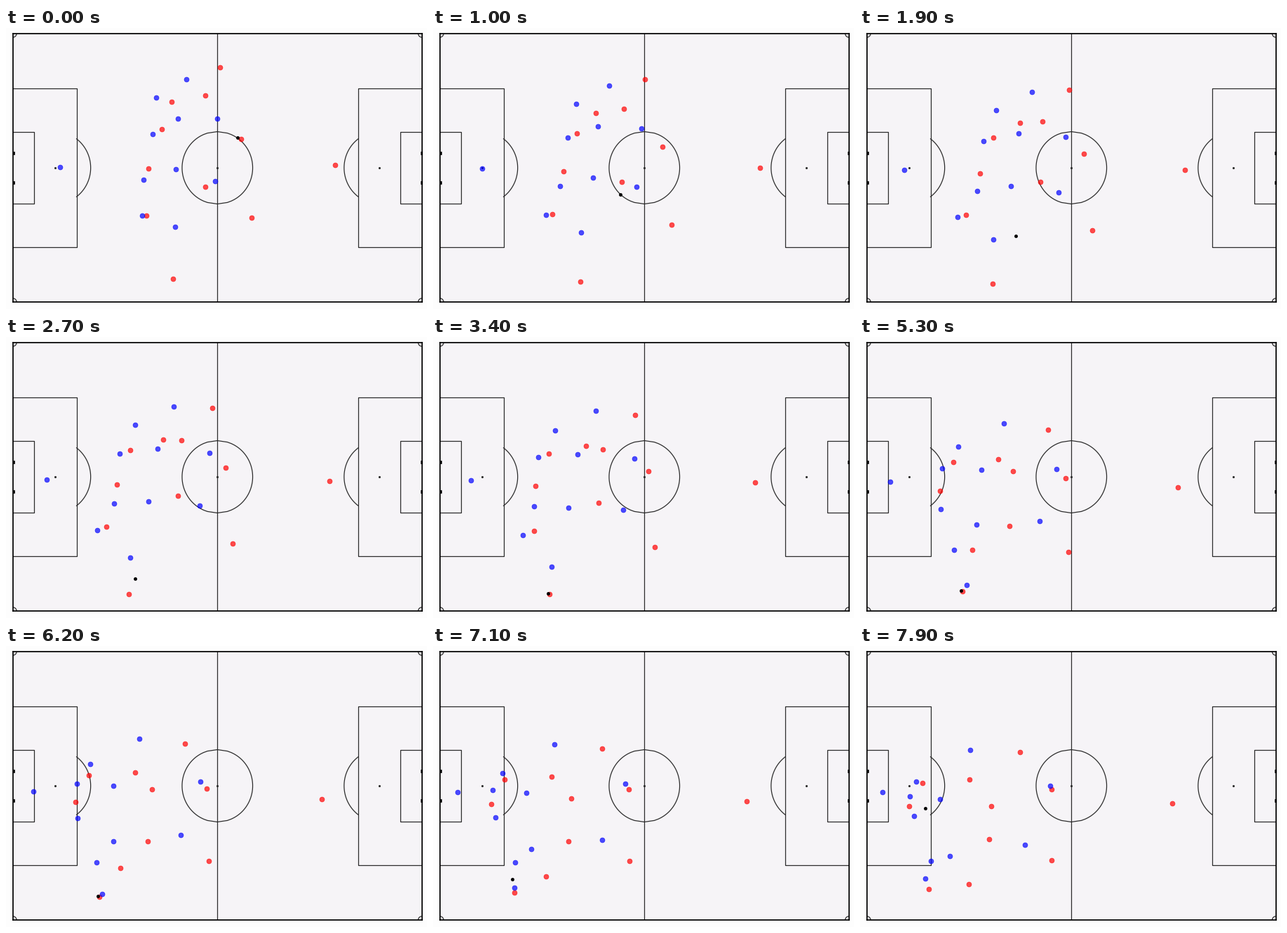
A matplotlib script that plays this animation: 600 by 400 pixels, repeating every 8 s.

```python
import numpy as np
import matplotlib.pyplot as plt
from matplotlib.animation import FuncAnimation

W, H, DPI = 600, 400, 50
FRAMES, STEP = 80, 100
LEFT, RIGHT, TOP, BOTTOM = 10, 592.5, 8, 390
CX, CY = (LEFT + RIGHT) / 2, (TOP + BOTTOM) / 2
HALF_L, HALF_W = (RIGHT - LEFT) / 2, (BOTTOM - TOP) / 2
YARD_X, YARD_Y = 5.03, 5.148  # pixels per yard
LINE = dict(color="#2c2c2c", linewidth=1.8)
END = (FRAMES - 1) * STEP / 1000
PASS_END, CROSS_START = 3.05, 6.95  # seconds

fig = plt.figure(figsize=(W / DPI, H / DPI), dpi=DPI, facecolor="#fdfdfd")
ax = fig.add_axes([LEFT / W, 1 - BOTTOM / H, (RIGHT - LEFT) / W, (BOTTOM - TOP) / H],
                  facecolor="#f6f4f7")
ax.set(xlim=(LEFT, RIGHT), ylim=(BOTTOM, TOP), xticks=[], yticks=[])
for spine in ax.spines.values():
    spine.set_linewidth(2.5)


def stroke(x, y):
    ax.plot(x, y, **LINE)


def dot(x, y):
    ax.scatter(x, y, s=20, c="#2c2c2c", linewidth=0, zorder=2)


def box(side, depth, half):
    goal = CX + side * HALF_L
    front = goal - side * depth * YARD_X
    y0, y1 = CY - half * YARD_Y, CY + half * YARD_Y
    stroke([goal, front, front, goal], [y0, y0, y1, y1])


def draw_pitch():
    span = np.linspace(-1, 1, 50)
    quarter = np.linspace(0, 1, 50)
    stroke([CX, CX], [TOP, BOTTOM])
    dot(CX, CY)
    y, d = 10 * span, 8 * span
    for side in (-1, 1):
        goal = CX + side * HALF_L
        stroke(CX + side * np.sqrt(100 - y**2) * YARD_X, CY + y * YARD_Y)
        box(side, 18, 22)
        box(side, 6, 10)
        dot(goal - side * 12 * YARD_X, CY)
        stroke(goal - side * (12 + np.sqrt(100 - d**2)) * YARD_X, CY + d * YARD_Y)
        ax.plot([goal, goal], [CY - 4 * YARD_Y, CY + 4 * YARD_Y], "ks", markersize=6)
        for end in (-1, 1):
            stroke(goal - side * np.sqrt(1 - quarter**2) * YARD_X,
                   CY + end * (HALF_W - quarter * YARD_Y))


def run(start, end, bow=(0, 0), swing=(0, 0)):
    """Straight run bent by a half wave (bow) and a full wave (swing)."""
    start, end, bow, swing = (np.array(v, float) for v in (start, end, bow, swing))

    def at(t):
        s = t / END
        return (start + (end - start) * s
                + bow * np.sin(np.pi * s) + swing * np.sin(2 * np.pi * s))

    return at


LATE = np.array([18, 0])  # holds back, then catches up
DIP = np.array([-1, 14])  # bends towards the near touchline

carrier = run((238, 357), (98, 346), (-8, 14), (-10, 0))
reds = [
    run((305, 56), (228, 151), LATE + DIP),
    run((236, 105), (156, 190), LATE + DIP),
    run((335, 158), (273, 204), DIP),
    run((350, 270), (273, 305), DIP),
    run((284, 96), (187, 228), DIP / 2),
    run((222, 144), (89, 195)),
    run((203, 200), (70, 228)),
    run((284, 226), (184, 275), (-5, -4), (0, -16)),
    run((200, 267), (155, 339), (-30, -20), (-18, -5)),
    run((469, 195), (445, 224)),
    carrier,
]
blues = [
    run((257, 73), (157, 148), LATE),
    run((214, 99), (80, 193), LATE - DIP / 2),
    run((245, 129), (114, 218), LATE),
    run((301, 129), (271, 199), DIP),
    run((196, 216), (77, 242), DIP),
    run((209, 151), (71, 214), -DIP / 2),
    run((242, 201), (128, 299)),
    run((298, 218), (235, 283)),
    run((194, 267), (101, 306), (-18, 2), (-20, -9)),
    run((241, 283), (93, 331), (-2, 30), (-14, -14)),
    run((77, 198), (32, 208), (-4, 2)),
]


def at_feet(t):
    return carrier(t) - (2, 1)


def ball_at(t):
    if t < PASS_END:
        a, b = np.array([330, 156]), at_feet(PASS_END)
        s = (t / PASS_END) ** 0.85
    elif t < CROSS_START:
        return at_feet(t)
    else:
        a, b = at_feet(CROSS_START), np.array([93, 231])
        s = (t - CROSS_START) / (END - CROSS_START)
    return a + (b - a) * s


draw_pitch()
red_dots, = ax.plot([], [], "ro", markersize=10, alpha=0.7)
blue_dots, = ax.plot([], [], "bo", markersize=10, alpha=0.7)
ball, = ax.plot([], [], "ko", markersize=6)


def update(frame):
    t = frame * STEP / 1000
    for dots, team in ((red_dots, reds), (blue_dots, blues)):
        dots.set_data(*np.array([player(t) for player in team]).T)
    x, y = ball_at(t)
    ball.set_data([x], [y])
    return red_dots, blue_dots, ball


anim = FuncAnimation(fig, update, frames=FRAMES, interval=STEP, repeat=True)
plt.show()
```
